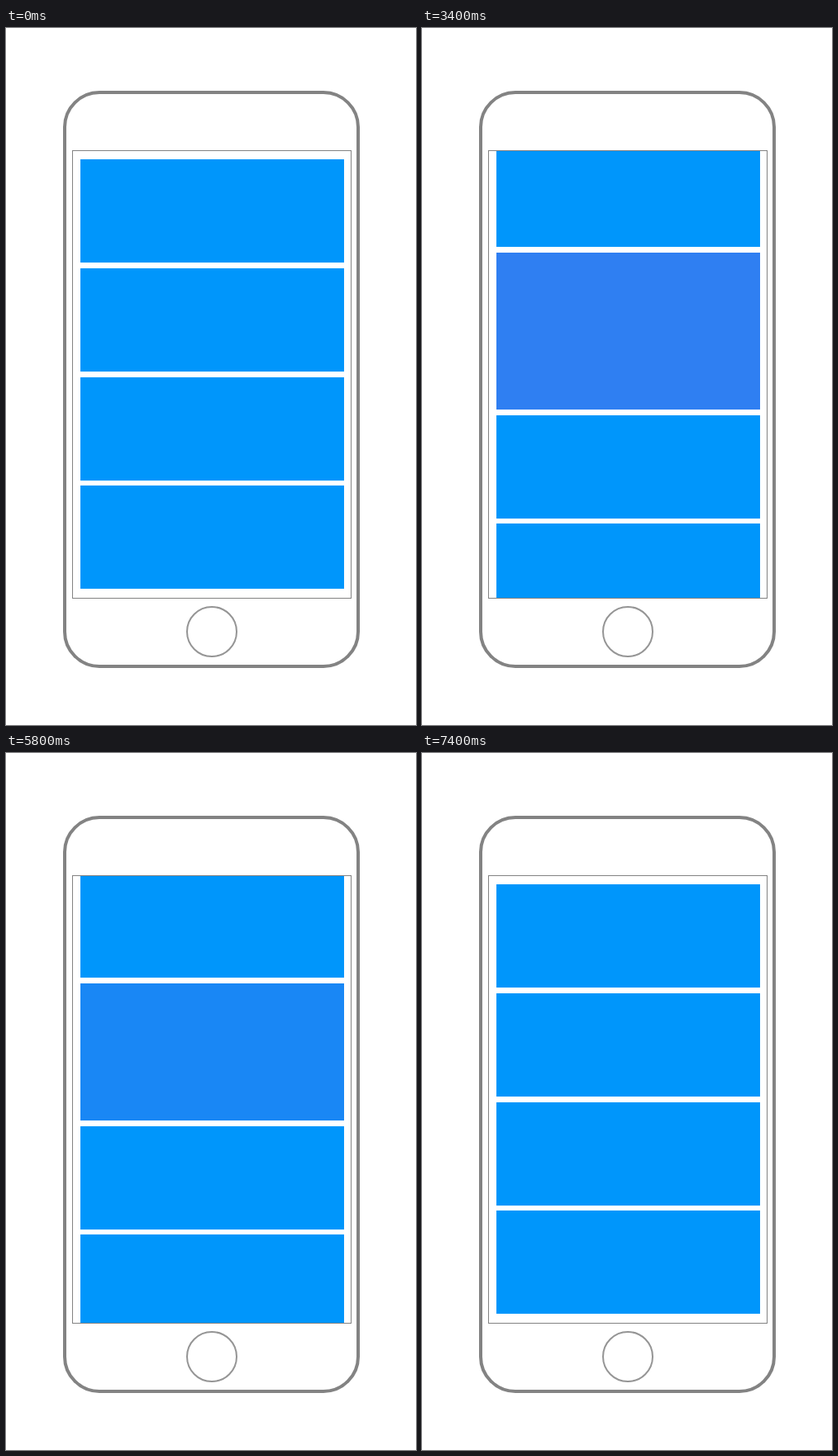
These frames come from a looping animation (496 by 844 pixels, 7.84 s). An HTML page:

```html
<!DOCTYPE html>
<html lang="en">
<head>
<meta charset="utf-8">
<title>Expanding card</title>
<style>
  html, body { margin: 0; width: 100%; height: 100%; overflow: hidden; background: #fff; }
  svg { display: block; width: 496px; height: 844px; }
</style>
</head>
<body>
<svg viewBox="0 0 496 844" fill="none">
  <defs>
    <clipPath id="screen"><rect x="81" y="149" width="336" height="541"/></clipPath>
  </defs>
  <rect x="71" y="78" width="355" height="695" rx="42" stroke="#838383" stroke-width="4"/>
  <g id="cards" clip-path="url(#screen)" fill="#0096fb" shape-rendering="crispEdges"></g>
  <rect x="80.5" y="148.5" width="337" height="542" stroke="#838383"/>
  <circle cx="249" cy="731" r="30" stroke="#959595" stroke-width="2"/>
</svg>
<script>
const LOOP = 7840, STEP = 40, DURATION = 300;
const TOGGLES = [930, 2190, 3361, 4569, 5776, 6831]; // open, close, open, ...
const TOPS = [159, 291, 423, 554];
const HEIGHT = 125, RISE = 92, DROP = 225;

const group = document.getElementById('cards');
const cards = TOPS.map(() => {
  const card = document.createElementNS('http://www.w3.org/2000/svg', 'rect');
  card.setAttribute('x', 90);
  card.setAttribute('width', 319);
  return group.appendChild(card);
});

// cubic-bezier(0, 0, .58, 1), solved by bisection
function easeOut(x) {
  if (x <= 0) return 0;
  if (x >= 1) return 1;
  let lo = 0, hi = 1;
  for (let i = 0; i < 24; i++) {
    const s = (lo + hi) / 2;
    if (1.74 * (1 - s) * s * s + s ** 3 < x) lo = s; else hi = s;
  }
  return 3 * (1 - lo) * lo * lo + lo ** 3;
}

function openness(time) {
  return TOGGLES.reduce((p, start, i) =>
    p + (i % 2 ? -1 : 1) * easeOut((time - start) / DURATION), 0);
}

const mix = (a, b, p) => Math.round(Math.min(255, Math.max(0, a + (b - a) * p)));

function render(time) {
  const p = openness(time);
  cards.forEach((card, i) => {
    const top = Math.round(TOPS[i] + (i < 2 ? -RISE : DROP) * p);
    const bottom = Math.round(TOPS[i] + HEIGHT + (i < 1 ? -RISE : DROP) * p);
    card.setAttribute('y', top);
    card.setAttribute('height', bottom - top);
  });
  // the red range overshoots both ends and is clamped
  cards[1].setAttribute('fill',
    `rgb(${mix(-12, 273, p)},${mix(150, 38, p)},${mix(251, 206, p)})`);
}

const begin = performance.now();
function tick() {
  const time = (performance.now() - begin) % LOOP;
  render(Math.floor(time / STEP) * STEP);
  requestAnimationFrame(tick);
}
tick();
</script>
</body>
</html>
```
